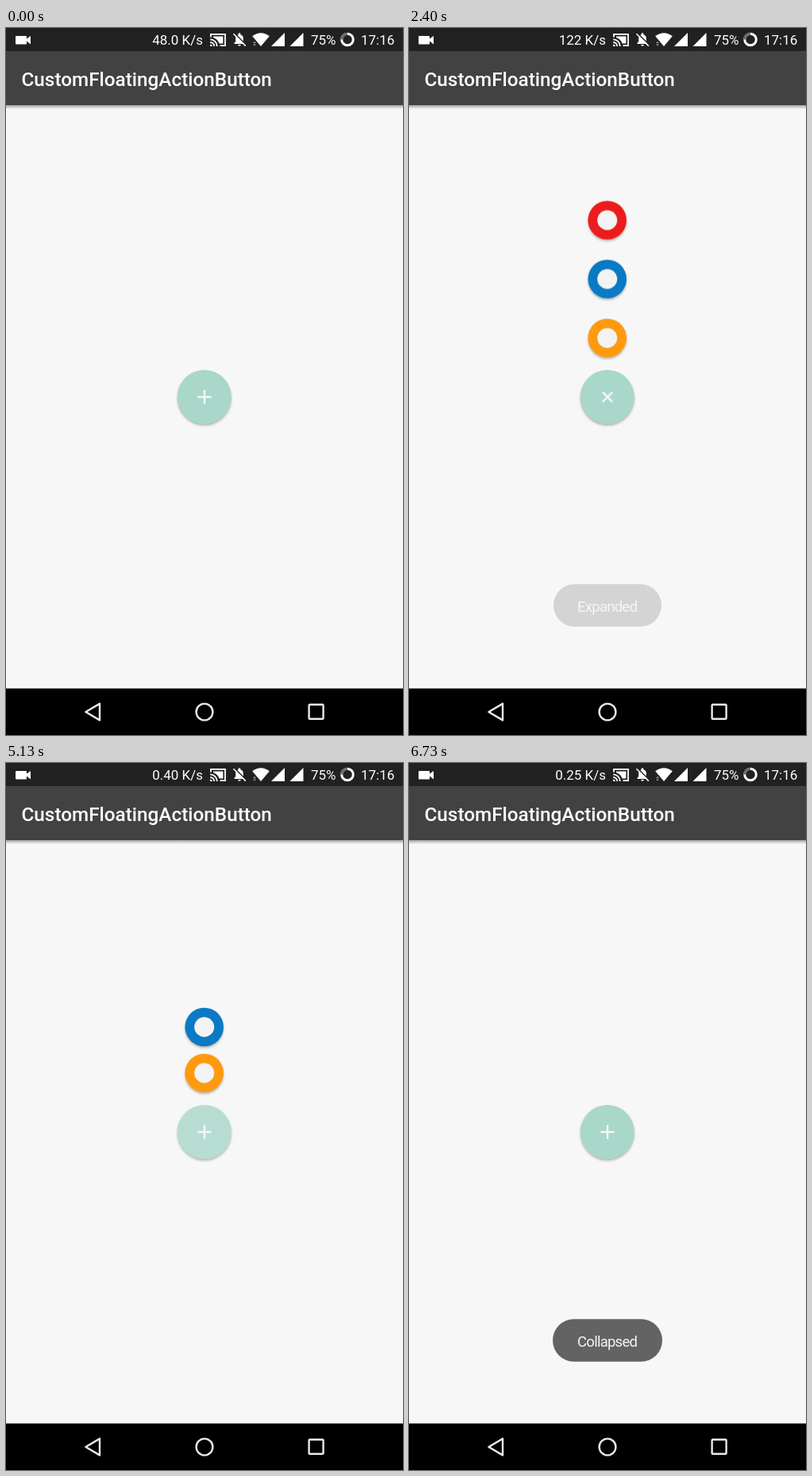
Write an HTML page that moves like this. It is 500 px wide and 889 px high and loops after 6790 ms.

```html
<!DOCTYPE html>
<html lang="en">
<head>
<meta charset="utf-8">
<title>Floating action button</title>
<style>
html, body { margin: 0; width: 100%; height: 100%; overflow: hidden; background: #f7f7f7; }
svg { display: block; width: 100vw; height: 100vh; font-family: Roboto, Arial, sans-serif; }

.status { font-size: 17px; fill: #fff; }
.title { font-size: 24.3px; font-weight: 500; fill: #fff; }
.nav { fill: none; stroke: #e9e9e9; stroke-width: 2.4; stroke-linejoin: round; }
.line { fill: none; stroke: #fff; stroke-width: 1.8; }
.lift { filter: drop-shadow(0 2px 1.8px rgba(0, 0, 0, .27)); }
.mark { fill: #f3f3f3; }

.mini, .plus, .ripple, .toast, .speed {
  animation: 6.79s linear infinite;
}
.mini, .plus { animation-timing-function: cubic-bezier(.37, 0, .63, 1); }

/* Items open one after another and close in reverse, 350 ms each */
.orange { animation-name: orange; }
.blue { animation-name: blue; }
.red { animation-name: red; }
@keyframes orange {
  0%, 17.45%, 84.76%, 100% { transform: translateY(0); }
  22.61%, 79.6% { transform: translateY(-74.2px); }
}
@keyframes blue {
  0%, 22.61%, 79.6%, 100% { transform: translateY(0); }
  27.76%, 74.45% { transform: translateY(-148.4px); }
}
@keyframes red {
  0%, 27.76%, 74.45%, 100% { transform: translateY(0); }
  32.92%, 69.29% { transform: translateY(-222.4px); }
}

.plus {
  transform-origin: 250px 464px;
  fill: none; stroke: #f7f7f7; stroke-width: 2.4;
  animation-name: turn;
}
@keyframes turn {
  0%, 17.45%, 74.45%, 100% { transform: rotate(0deg); }
  22.61%, 69.29% { transform: rotate(45deg); }
}

.ripple { fill: #fff; animation-name: ripple; }
@keyframes ripple {
  0%, 17.67%, 26.22%, 69.51%, 78.06%, 100% { opacity: 0; }
  20.62%, 72.46% { opacity: .38; }
}

.toast { font-size: 18.5px; letter-spacing: -.75px; text-anchor: middle; }
.toast rect { fill: #636363; }
.toast text { fill: #f4f4f4; }
.expanded { animation-name: expanded; }
.collapsed { animation-name: collapsed; }
@keyframes expanded {
  0%, 33.43%, 70.13%, 100% { opacity: 0; }
  41.68%, 62% { opacity: 1; }
}
@keyframes collapsed {
  0%, 85.27% { opacity: 0; }
  93.52%, 100% { opacity: 1; }
}

.speed { text-anchor: end; animation-timing-function: step-end; }
.s1 { animation-name: s1; }
.s2 { animation-name: s2; }
.s3 { animation-name: s3; }
.s4 { animation-name: s4; }
@keyframes s1 { 0% { opacity: 1; } 9.86%, 100% { opacity: 0; } }
@keyframes s2 { 0%, 54.04%, 100% { opacity: 0; } 9.86% { opacity: 1; } }
@keyframes s3 { 0%, 99.1%, 100% { opacity: 0; } 54.04% { opacity: 1; } }
@keyframes s4 { 0% { opacity: 0; } 99.1%, 100% { opacity: 1; } }
</style>
</head>
<body>
<svg viewBox="0 0 500 889" preserveAspectRatio="none">
  <defs>
    <linearGradient id="shade" x2="0" y2="1">
      <stop offset="0" stop-color="#000" stop-opacity=".34"/>
      <stop offset="1" stop-color="#000" stop-opacity="0"/>
    </linearGradient>
  </defs>

  <rect width="500" height="889" fill="#f7f7f7"/>
  <rect y="97" width="500" height="5" fill="url(#shade)"/>
  <rect y="29" width="500" height="68" fill="#424242"/>
  <rect width="500" height="29" fill="#212121"/>
  <text class="title" x="19.5" y="73">CustomFloatingActionButton</text>

  <g class="status">
    <path d="M13 10H25Q26 10 26 11V13.6L31 10V20.4L26 16.6V19.4Q26 20.4 25 20.4H13Q12 20.4 12 19.4V11Q12 10 13 10Z"/>
    <text class="speed s1" x="248" y="21">48.0 K/s</text>
    <text class="speed s2" x="248" y="21">122 K/s</text>
    <text class="speed s3" x="248" y="21">0.40 K/s</text>
    <text class="speed s4" x="248" y="21">0.25 K/s</text>

    <!-- cast -->
    <path class="line" d="M258 11.5V7.9H276V22.1H269.5"/>
    <path d="M261 10.6H273.4V19.6H268.6Q266.5 14 261 12.1Z"/>
    <path class="line" d="M257.2 14.4A8.6 8.6 0 0 1 265.8 23M257.2 18A5 5 0 0 1 262.2 23"/>
    <path d="M257.2 20.4A2.6 2.6 0 0 1 259.8 23H257.2Z"/>

    <!-- muted bell -->
    <path d="M287.5 20V18.8L289.2 17V13Q289.2 9.4 292.6 8.5V7.6A1.4 1.4 0 0 1 295.4 7.6V8.5Q298.8 9.4 298.8 13V17L300.5 18.8V20ZM292.2 21H295.8A1.8 1.8 0 0 1 292.2 21Z"/>
    <path d="M287.8 6.6L302.4 21.2" stroke="#212121" stroke-width="1.6"/>
    <path class="line" d="M286.4 7.2L301.8 22.6" style="stroke-width:1.5"/>

    <!-- signal -->
    <path d="M310.2 10.2Q321 2.4 331.8 10.2L321 23Z"/>
    <path d="M311 19H315L313 17ZM311 20.5H315L313 22.5Z" opacity=".6"/>
    <path d="M334 23L351 6V23ZM357.5 23L374.5 6V23Z"/>

    <text x="384" y="21">75%</text>
    <circle cx="430" cy="14.5" r="7.3" fill="none" stroke="#fff" stroke-width="3"/>
    <path d="M422.7 14.5A7.3 7.3 0 0 1 430 7.2" fill="none" stroke="#6a6a6a" stroke-width="3.1"/>
    <text x="447" y="21">17:16</text>
  </g>

  <g class="mini orange">
    <circle class="lift" cx="249.7" cy="464" r="24.3" fill="#ff9a0f"/>
    <circle class="mark" cx="249.7" cy="464" r="12.5"/>
  </g>
  <g class="mini blue">
    <circle class="lift" cx="249.7" cy="464" r="24.3" fill="#0a7ac4"/>
    <circle class="mark" cx="249.7" cy="464" r="12.5"/>
  </g>
  <g class="mini red">
    <circle class="lift" cx="249.7" cy="464" r="24.3" fill="#eb1c1c"/>
    <circle class="mark" cx="249.7" cy="464" r="12.5"/>
  </g>

  <circle class="lift" cx="249.8" cy="464" r="34" fill="#a9d7ca"/>
  <circle class="ripple" cx="249.8" cy="464" r="34"/>
  <path class="plus" d="M241.3 464H258.7M250 455.3V472.7"/>

  <g class="toast expanded">
    <rect x="182" y="699.3" width="136" height="53.5" rx="26.7"/>
    <text x="249.6" y="733.5">Expanded</text>
  </g>
  <g class="toast collapsed">
    <rect x="181" y="699.3" width="138" height="53.5" rx="26.7"/>
    <text x="249.6" y="733.5">Collapsed</text>
  </g>

  <rect y="830.5" width="500" height="58.5"/>
  <g class="nav">
    <path d="M118 849.6V870.4L100.4 860Z"/>
    <circle cx="250" cy="860" r="10.4"/>
    <rect x="381.6" y="850.8" width="18" height="18" rx="1"/>
  </g>
</svg>
</body>
</html>
```
